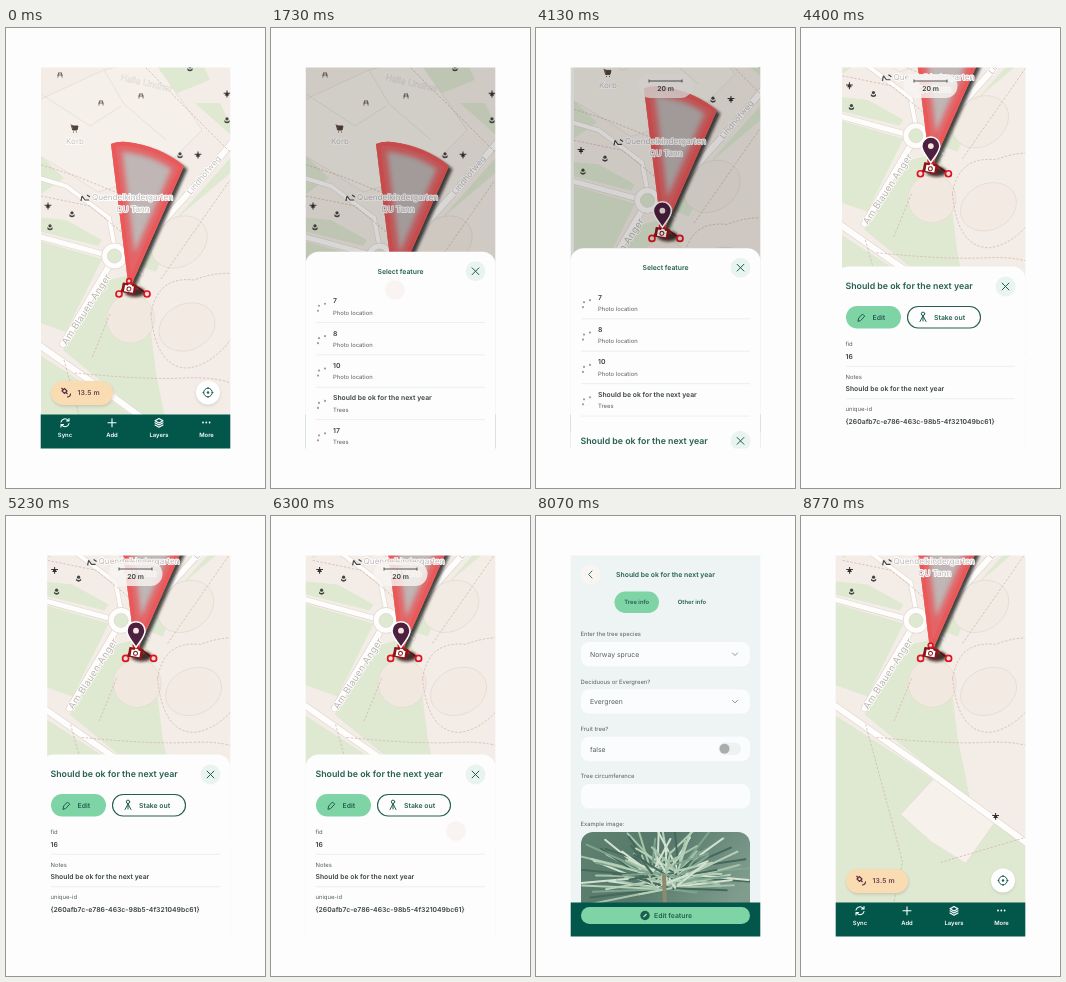
Animation of 259x460 px, one loop 8.83 s. Source, as an HTML page:

```html
<!DOCTYPE html>
<html lang="en">
<head>
<meta charset="utf-8">
<title>Field map</title>
<style>
html, body { margin: 0; width: 100%; height: 100%; overflow: hidden; background: #fdfdfd; }
svg { display: block; font-family: Inter, Roboto, sans-serif; text-rendering: geometricPrecision; }
.b { font-weight: 600; }
.mid { text-anchor: middle; }
.s { font-size: 5.86px; }
.m { font-size: 6.84px; }
.l { font-size: 8.8px; }
.dark { fill: #245e50; }
.ink { fill: #39423f; }
.soft { fill: #56605d; }
.line { stroke: #e6e8e7; stroke-width: .7; }
.stroke { fill: none; stroke: #1c5c4e; stroke-width: 1; stroke-linecap: round; stroke-linejoin: round; }
.nav { fill: none; stroke: #fff; stroke-width: 1.1; stroke-linecap: round; stroke-linejoin: round; }
.green { fill: #dfe9d2; }
.case { fill: none; stroke: #dcd6cf; stroke-linecap: round; }
.road { fill: none; stroke: #fefdfb; stroke-linecap: round; }
.edge { stroke: #e2dad1; stroke-width: .7; }
.trail { fill: none; stroke: #d3b8ae; stroke-width: .8; stroke-dasharray: 2.4 1.6; }
.halo { paint-order: stroke; stroke: #fff; stroke-width: 1.8; stroke-linejoin: round; }
</style>
</head>
<body>
<svg width="259" height="460" viewBox="0 0 259 460">
<defs>
  <path id="wedge" d="M123 262L105 116Q112 113 121 114Q154 118 178 138Z"/>
  <clipPath id="inWedge"><use href="#wedge"/></clipPath>
  <clipPath id="photoClip"><rect x="45" y="316" width="169" height="110" rx="12"/></clipPath>
  <filter id="soft" x="-30%" y="-30%" width="160%" height="160%"><feGaussianBlur stdDeviation="2.8"/></filter>
  <filter id="shade" x="-30%" y="-30%" width="160%" height="160%"><feGaussianBlur stdDeviation="1.7"/></filter>
  <linearGradient id="leaf" x1="0" y1="0" x2="1" y2=".4">
    <stop offset="0" stop-color="#5f8170"/><stop offset=".45" stop-color="#55786a"/><stop offset="1" stop-color="#7f9c8d"/>
  </linearGradient>
  <g id="tree"><path d="M0 -4V4M-4 -1H4M-2.5 1.2H2.5" stroke="#333" stroke-width="1.2"/><circle r="1.8" fill="#333"/></g>
  <g id="flower" fill="#444"><circle cy="-1.4" r="1.9"/><path d="M-3 0Q0 4 3 0V2.6Q0 5 -3 2.6Z"/></g>
  <g id="table"><path d="M-2.4 -2.4H2.4M-3.4 0H3.4M-1.5 -2.4L-2.6 3M1.5 -2.4L2.6 3" stroke="#5e5049" stroke-width=".9" fill="none"/></g>
  <g id="cross"><circle r="10" fill="#e9f4f0"/><path class="stroke" d="M-3.4 -3.4L3.4 3.4M3.4 -3.4L-3.4 3.4"/></g>
</defs>
<rect width="259" height="460" fill="#fdfdfd"/>
<g id="map">
  <rect x="15" y="0" width="230" height="560" fill="#f4ede7"/>
  <path class="green" d="M20 188L60 192L96 212L92 218L20 200Z M20 209L96 231L60 304L20 290Z M103 252L57 322L163 409L150 345L142 280L132 245Z M20 318L113 378L235 466V560H20Z M134 238L162 200L235 118V136L176 186L150 244Z M148 30H194L204 52L166 67Z M189 75L214 75L226 100V108Z M35 128L58 150L35 166Z"/>
  <path class="edge" d="M20 78L98 42L146 30L196 102L152 146L92 164L58 142L20 120Z" fill="#f5f1ea"/>
  <path class="edge" d="M35 66L84 98L115 78M98 42L118 76L160 112" fill="none"/>
  <path class="edge" d="M93 422L128 384L188 429L158 471L123 449Z" fill="#f6f2eb"/>
  <ellipse class="edge" cx="173" cy="214" rx="30" ry="24" transform="rotate(-35 173 214)" fill="#f2ebe3"/>
  <path d="M146 276Q155 250 188 250Q224 246 235 270V410L178 382Q142 330 146 276Z" fill="#f4ece6"/>
  <ellipse class="edge" cx="181" cy="299" rx="29" ry="23" transform="rotate(-25 181 299)" fill="#f2eae3"/>
  <circle class="edge" cx="124.5" cy="291" r="24" fill="#f1e8df"/>
  <g id="roads"></g>
  <circle cx="108.5" cy="228" r="13" fill="#fefdfb" stroke="#dcd6cf" stroke-width=".8"/>
  <circle cx="108.5" cy="228" r="7" fill="#dfe9d2" stroke="#dcd6cf" stroke-width=".7"/>
  <path class="trail" d="M35 168L84 178L137 222M145 286Q151 248 188 252Q214 242 235 247M145 286Q150 340 182 340Q212 336 235 296M69 345Q140 352 178 350T235 360M58 332L82 420L95 470L84 520M133 470L235 440M104 286L86 330M155 251L224 152M20 132L70 148L124 170M140 40L235 135"/>
  <g id="icons"></g>
  <path d="M66 98H72L71 102H67ZM65 97L67 98M67.500 104h.1M70.500 104h.1" stroke="#54413c" stroke-linecap="round" fill="#54413c"/>
  <text class="mid halo" x="69" y="116" font-size="8" fill="#c9c1bd">Korb</text>
  <text class="mid" transform="translate(140 58) rotate(13)" font-size="8.500" fill="#fff" stroke="#d8d0ca" stroke-width=".4">Halle Lindhof</text>
  <text class="mid halo" transform="translate(83 283) rotate(-57)" font-size="9.500" letter-spacing=".300" fill="#b9b4ae">Am Blauen Anger</text>
  <text class="mid halo" transform="translate(200 149) rotate(-50)" font-size="8.500" fill="#c4beb8">Lindhofweg</text>
  <use href="#wedge" x="3.500" y="3" fill="#111" opacity=".75" filter="url(#shade)"/>
  <use href="#wedge" fill="#bfb6b5"/>
  <g clip-path="url(#inWedge)">
    <use href="#wedge" fill="none" stroke="#ee4a4d" stroke-width="20" opacity=".75" filter="url(#soft)"/>
    <use href="#wedge" fill="none" stroke="#ee5555" stroke-width="8" opacity=".8"/>
  </g>
  <path d="M76 168L79 172H83M76 168L75 173M81 167l3 2" stroke="#444" stroke-width="1.200" fill="none"/>
  <g class="mid halo" font-size="8.150" fill="#c0b8b8">
    <text x="126.500" y="172">Quendelkindergarten</text>
    <text x="127" y="184">QU Tann</text>
  </g>
  <path d="M113 266L123 253L141 266" fill="none" stroke="#d3161d" stroke-width="1.800"/>
  <ellipse cx="129" cy="264" rx="10" ry="5" fill="#250709" opacity=".85" filter="url(#shade)"/>
  <g fill="#f7d9d7" stroke="#dc1620" stroke-width="1.700"><circle cx="113" cy="266" r="3"/><circle cx="141" cy="266" r="3"/><circle cx="123" cy="253" r="2.300"/></g>
  <g transform="translate(123 260.500) rotate(10) scale(.9)">
    <rect x="-8" y="-5.500" width="16" height="11" rx="1" fill="#8d151a"/>
    <path d="M-5 -3H-2L-1 -4.500H2L3 -3H5V4H-5Z" fill="#fff"/>
    <circle cy=".5" r="2.200" fill="#fff" stroke="#8d1a1e" stroke-width="1.100"/>
  </g>
  <g id="pin">
    <path d="M123.400 255C119 248 114.400 244 114.400 238.300A9 9 0 0 1 132.400 238.300C132.400 244 128 248 123.400 255Z" fill="#4d203f" stroke="#fff" stroke-width="1.500"/>
    <circle cx="123.400" cy="238.300" r="2.900" fill="#f6e6e2"/>
  </g>
</g>
<rect id="gap" x="34" y="39" width="0" height="382" fill="#fdfdfd"/>
<g id="scale">
  <rect x="102.500" y="46" width="54" height="24" rx="12" fill="#f7f5f2" opacity=".82"/>
  <path d="M113 51.500V54.500M113 53H146M146 51.500V54.500" stroke="#444" stroke-width=".9" fill="none"/>
  <text class="mid b m ink" x="129.500" y="62.800">20 m</text>
</g>
<g id="tools">
  <rect x="45.500" y="354.500" width="62" height="24" rx="12" fill="#876" opacity=".3" filter="url(#shade)"/>
  <rect x="45" y="353" width="62" height="24" rx="12" fill="#f9dcb2"/>
  <g fill="none" stroke="#5b2b45" stroke-width="1.200"><path d="M56 363L58.500 360.500L61 363L58.500 365.500ZM55.500 360L57 361.500M60 364.500L61.500 366M61 369Q64.500 369 64.500 365.500M61 366.800h.1"/></g>
  <text class="b m" x="71.500" y="367.400" letter-spacing=".2" fill="#6b3a53">13.5 m</text>
  <circle cx="202" cy="366" r="12" fill="#888" opacity=".25" filter="url(#shade)"/>
  <circle cx="202" cy="364.500" r="12" fill="#fff"/>
  <g class="stroke" stroke-width=".8"><circle cx="202" cy="364.500" r="4.300"/><path d="M202 359.500v.7M202 368.800v.7M197 364.500h.7M206.300 364.500h.7"/></g>
  <circle cx="202" cy="364.500" r="1.200" fill="#1c5c4e"/>
  <rect x="34" y="386.500" width="191" height="35" fill="#03574a"/>
  <path class="nav" d="M55 394A4 4 0 0 1 62 392.300M63 390.500V393H60.500M63 395.500A4 4 0 0 1 56 397.200M55 399V396.500H57.500M106 390.700V398.700M102 394.700H110M153 390.500L157 392.700L153 395L149 392.700ZM149 394.800L153 397L157 394.800M149 397L153 399.200L157 397"/>
  <g fill="#fff"><circle cx="197" cy="394.500" r=".9"/><circle cx="200.300" cy="394.500" r=".9"/><circle cx="203.600" cy="394.500" r=".9"/></g>
  <g class="mid b s" fill="#fff"><text x="59" y="408.600">Sync</text><text x="106" y="408.600">Add</text><text x="153" y="408.600">Layers</text><text x="200.500" y="408.600">More</text></g>
</g>
<rect id="dim" x="34" y="39" width="191" height="383" fill="#000"/>
<g id="list">
  <rect x="34.500" y="111" width="190" height="340" rx="13" fill="#fdfdfd"/>
  <text class="mid b m dark" x="129.500" y="132.800">Select feature</text>
  <use href="#cross" x="204.500" y="130.500"/>
  <g id="rows"></g>
</g>
<g id="panel">
  <rect x="34.500" y="238.500" width="190" height="220" rx="13" fill="#fdfdfd"/>
  <text class="b l dark" x="44.500" y="261.300">Should be ok for the next year</text>
  <use href="#cross" x="204.500" y="258.500"/>
  <rect x="45" y="278" width="55" height="22.500" rx="11.250" fill="#7fd4a6"/>
  <path class="stroke" stroke-width=".9" d="M57 293L57.700 290L61.500 286L63.700 288.200L60 292.200Z"/>
  <text class="b m dark" x="71.500" y="291.700">Edit</text>
  <rect x="106.500" y="278.500" width="73" height="21.500" rx="10.750" fill="#fdfdfd" stroke="#245e50" stroke-width="1.100"/>
  <path class="stroke" d="M122 287.500V293M122 288L119 293.500M122 288L125 293.500"/><circle class="stroke" cx="122" cy="285.800" r="1.700"/>
  <text class="b m dark" x="133" y="291.700">Stake out</text>
  <g id="facts"></g>
</g>
<g id="form">
  <rect x="34" y="39" width="191" height="383" fill="#edf4f3"/>
  <circle cx="54.500" cy="58.500" r="10" fill="#fdfefe"/><path class="stroke" d="M56 55L52.600 58.500L56 62"/>
  <text class="mid b m dark" x="129.500" y="60.900">Should be ok for the next year</text>
  <rect x="78.500" y="75.500" width="44.500" height="21.500" rx="10.750" fill="#7fd4a6"/>
  <g class="mid b s dark"><text x="100.700" y="88.400">Tree info</text><text x="156" y="88.400">Other info</text></g>
  <g id="fields"></g>
  <rect x="182.500" y="226.500" width="22.500" height="12.500" rx="6.250" fill="#eef2f1"/><circle cx="188.500" cy="232.700" r="5" fill="#a9adac"/>
  <g clip-path="url(#photoClip)"><rect x="45" y="316" width="169" height="110" fill="url(#leaf)"/><g id="needles" fill="none" stroke-linecap="round"></g></g>
  <rect x="34" y="386.500" width="191" height="35" fill="#03574a"/>
  <rect x="45" y="391" width="169" height="17" rx="8.500" fill="#7fd4a6"/>
  <circle cx="109" cy="399.500" r="4.700" fill="#1c5c4e"/><path d="M107.500 401L110.600 397.900" stroke="#a4e3c1" stroke-width="1.400"/>
  <text class="b m dark" x="118" y="402">Edit feature</text>
</g>
<circle id="tap" r="10" fill="#e9cbbd" opacity=".18"/>
<path fill="#fdfdfd" fill-rule="evenodd" d="M0 0H259V460H0Z M34.700 39.500H224.300V420.400H34.700Z"/>
</svg>
<script>
const LOOP = 8830;
const $ = id => document.getElementById(id);
const text = (x, y, s, cls) => `<text x="${x}" y="${y}" class="${cls}">${s}</text>`;
const rule = y => `<path class="line" d="M45 ${y}H214"/>`;

// map furniture
const roads = [
  [6, 'M20 308L113 373L240 466'], [6, 'M103 238L57 316'], [5, 'M20 205L97 226'],
  [6, 'M117 224L140 212L198 148L235 104'], [4, 'M108 216L103 190L60 158L20 146'], [3, 'M120 234L136 246']
];
$('roads').innerHTML =
  roads.map(([w, d]) => `<path class="case" stroke-width="${w + 1.2}" d="${d}"/>`).join('') +
  roads.map(([w, d]) => `<path class="road" stroke-width="${w}" d="${d}"/>`).join('');
const spots = {
  tree: [[42, 178], [192, 127], [221, 66], [188, 424]],
  flower: [[66, 186], [44, 199], [174, 127], [221, 92], [184, 40]],
  table: [[54, 47], [95, 75], [135, 68]]
};
$('icons').innerHTML = Object.entries(spots).map(([id, list]) =>
  list.map(([x, y]) => `<use href="#${id}" transform="translate(${x} ${y}) scale(.85)"/>`).join('')).join('');

// feature list
const names = ['7', '8', '10', 'Should be ok for the next year', '17', '18', '19', '20'];
$('rows').innerHTML = names.map((name, i) => {
  const y = 160 + 32.4 * i;
  const dots = [[54, 3], [48, 5], [47, 10]].map(([x, d]) =>
    `<circle cx="${x}" cy="${y + d}" r="1.1" fill="#9a9f9d"/>`).join('');
  return dots + text(62, y + 2.4, name, 'b m ink') +
    text(62, y + 13.8, i < 3 ? 'Photo location' : 'Trees', 's soft') +
    (i < 7 ? rule(y + 21.7) : '');
}).join('');

// preview
const facts = [['fid', '16'], ['Notes', 'Should be ok for the next year'],
  ['unique-id', '{260afb7c-e786-463c-98b5-4f321049bc61}']];
$('facts').innerHTML = facts.map(([k, v], i) => {
  const y = 318.2 + 32.5 * i;
  return text(44.5, y, k, 's soft') + text(44.5, y + 12.5, v, 'b m ink') + (i < 2 ? rule(y + 20.1) : '');
}).join('');

// form
const fields = [['Enter the tree species', 'Norway spruce', 1], ['Deciduous or Evergreen?', 'Evergreen', 1],
  ['Fruit tree?', 'false'], ['Tree circumference', ''], ['Example image:']];
$('fields').innerHTML = fields.map(([label, value, menu], i) => {
  const y = 120.2 + 47.4 * i;
  let s = text(44.5, y, label, 's soft');
  if (value !== undefined) s += `<rect x="45" y="${y + 5.7}" width="169" height="24.5" rx="8" fill="#fbfcfd"/>` +
    text(54, y + 20.5, value, 'm soft');
  if (menu) s += `<path class="stroke" style="stroke:#8b9492" d="M196.500 ${y + 16.8}l2.500 2.500l2.500 -2.500"/>`;
  return s;
}).join('');

// spruce needles fan out from a hub, long ones first
const tones = ['#a5c4aa', '#7fa58f', '#d3e2d2', '#45685a', '#b7d0b8'];
let art = '';
for (let i = 0; i < 90; i++) {
  const a = -Math.PI * (1.1 - 1.2 * (i * .618 % 1)), len = 92 - .6 * i + 10 * Math.sin(i * 2.3);
  const x = 129 + 14 * Math.sin(i * 1.7), y = 364 + 9 * Math.cos(i * 2.9);
  art += `<path stroke="${tones[i % 5]}" stroke-width="2" d="M${x} ${y}L${x + len * Math.cos(a)} ${y + .62 * len * Math.sin(a)}"/>`;
}
$('needles').innerHTML = art + '<path stroke="#8d8b6c" stroke-width="4" d="M129 390L128 360"/>';

// motion
const ramp = (t, a, b) => Math.min(1, Math.max(0, (t - a) / (b - a)));
const inOut = p => p < .5 ? 2 * p * p : 1 - 2 * (1 - p) ** 2;
const out = p => 1 - (1 - p) ** 2;
const show = (id, on) => $(id).style.display = on ? '' : 'none';
const slide = (id, y) => $(id).setAttribute('transform', `translate(0 ${y})`);
const taps = [[1500, 250, 124, 262], [3470, 430, 184, 262], [5870, 560, 185, 315], [7870, 360, 54.5, 58.5]];

function draw(t) {
  const pan = inOut(ramp(t, 3818, 4478));
  $('map').setAttribute('transform', `translate(${6.6 * pan} ${-123.6 * pan})`);
  $('gap').setAttribute('width', t < 5880 ? 1 + 6.2 * pan : 0);

  const list = out(ramp(t, 1600, 1930)) - ramp(t, 4050, 4280);
  slide('list', 310 * (1 - list));
  show('list', list > 0);
  $('dim').setAttribute('opacity', .37 * list * list);

  const picked = t > 3818 && t < 6800;
  show('pin', picked);
  show('scale', picked);
  show('tools', t < 4325 || t > 6800);
  slide('panel', 183 * (1 - ramp(t, 4095, 4325)));
  show('panel', t > 4095 && t < 6800);

  const form = out(ramp(t, 6430, 6720)) - inOut(ramp(t, 8230, 8500));
  slide('form', 382 * (1 - form));
  show('form', form > 0);

  const tap = taps.find(([start, dur]) => t >= start && t < start + dur);
  show('tap', tap);
  if (tap) $('tap').setAttribute('transform', `translate(${tap[2]} ${tap[3]})`);
}

const begin = performance.now();
function tick() {
  draw((performance.now() - begin) % LOOP);
  requestAnimationFrame(tick);
}
draw(0);
requestAnimationFrame(tick);
</script>
</body>
</html>
```
